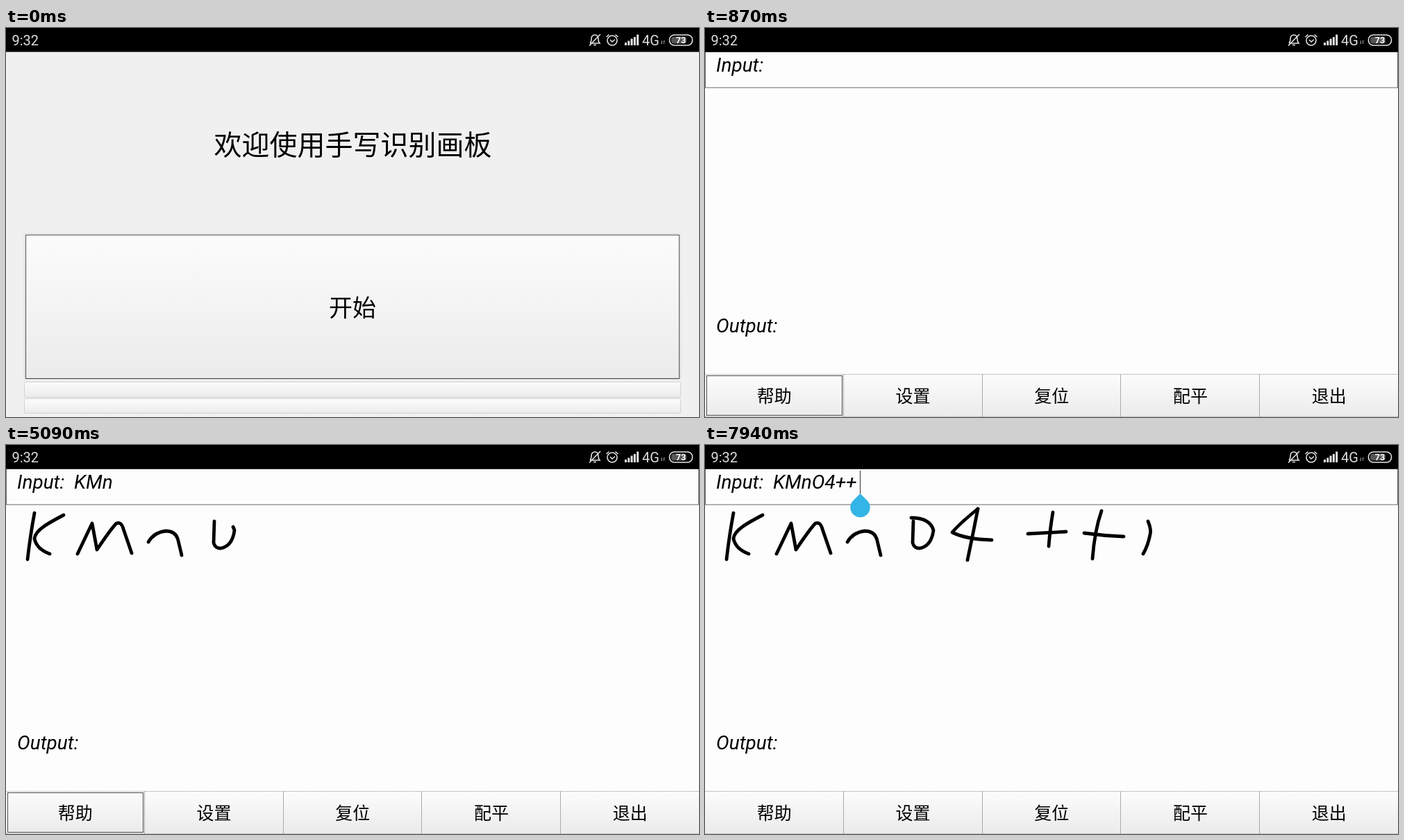
Write an HTML page that moves like this. It is 998 px wide and 561 px high and loops after 7.99 s.

```html
<!DOCTYPE html>
<html lang="zh-CN">
<head>
<meta charset="utf-8">
<title>手写识别画板</title>
<style>
  html, body { margin: 0; width: 100%; height: 100%; overflow: hidden; background: #f0f0f0; }
  svg { display: block; width: 100%; height: 100%; }
  text { white-space: pre; }
  .cjk { font-family: "Noto Sans CJK SC", "Noto Sans CJK", sans-serif; text-anchor: middle; }
  .field { font: italic 28px Roboto, sans-serif; }
  .status { font: 20px Roboto, sans-serif; fill: #ddd; }
  .icon { fill: none; stroke: #e4e4e4; stroke-width: 1.6; }
  .focus { fill: none; stroke: #4c4c4c; }
  #ink { fill: none; stroke: #000; stroke-width: 4.8; stroke-linecap: round; stroke-linejoin: round; }
</style>
</head>
<body>
<svg viewBox="0 0 998 561">
  <defs>
    <linearGradient id="face" x2="0" y2="1"><stop stop-color="#fcfcfc"/><stop offset="1" stop-color="#ebebeb"/></linearGradient>
    <linearGradient id="hover" x2="0" y2="1"><stop stop-color="#fff"/><stop offset="1" stop-color="#f2f2f2"/></linearGradient>
  </defs>

  <g id="home">
    <rect width="998" height="561" fill="#f0f0f0"/>
    <text class="cjk" x="499.5" y="183" font-size="40">欢迎使用手写识别画板</text>
    <g stroke="#d2d2d2" fill="url(#face)">
      <rect id="start" x="26.5" y="296.5" width="945" height="210" rx="1"/>
      <rect x="26.5" y="510.5" width="945" height="22" rx="1"/>
      <rect x="26.5" y="534.5" width="945" height="21" rx="1"/>
    </g>
    <rect class="focus" x="28.5" y="298.5" width="941" height="207"/>
    <text class="cjk" x="499" y="416" font-size="34">开始</text>
  </g>

  <g id="board">
    <rect width="998" height="561" fill="#fdfdfd"/>
    <rect x=".5" y="34.5" width="997" height="51.5" fill="none" stroke="#666"/>
    <text class="field" id="input" x="16" y="63"></text>
    <text class="field" x="16" y="439">Output:</text>
    <g id="buttons"></g>
    <rect class="focus" id="focus" x="2.5" y="501.5" width="195" height="57"/>
    <g id="ink"></g>
    <g id="caret">
      <path d="M223.5 37V72" stroke="#333"/>
      <path d="M223.5 70l10 10a14.2 14.2 0 1 1-20 0z" fill="#33b5e5"/>
    </g>
  </g>

  <rect width="998" height="34.5"/>
  <text class="status" x="8.5" y="25">9:32</text>
  <path class="icon" d="M841 22h14q-2-2-2-6 0-6-5-6t-5 6q0 4-2 6M846 24.5h4M840 25.5 856 9"/>
  <g class="icon">
    <circle cx="873" cy="18" r="7"/>
    <path d="M864.5 13l4-3.5M881.5 13l-4-3.5M870 17l3 3 4-3.5"/>
  </g>
  <path d="M891 25v-4h3v4zm4.3 0v-6.5h3V25zm4.3 0v-9.5h3V25zm4.3 0V13h3v12zm4.3 0V9.5h3V25z" fill="#e4e4e4"/>
  <text class="status" x="916" y="25">4G</text>
  <path d="M944.5 18v5m-1.5-1.5 1.5 1.5M947.5 23v-5m1.5 1.5-1.5-1.5" stroke="#999" fill="none"/>
  <rect x="958" y="12.5" width="22" height="10" rx="4" fill="#555"/>
  <rect class="icon" x="955.5" y="10" width="33" height="15" rx="7"/>
  <text class="status" x="972" y="22" text-anchor="middle" style="font-size:12.5px;font-weight:bold;fill:#fff">73</text>
</svg>
<script>
const LOOP = 7990;
const el = id => document.getElementById(id);
const show = (node, on) => node.setAttribute("display", on ? "inline" : "none");

el("buttons").innerHTML = ["帮助", "设置", "复位", "配平", "退出"].map((label, i) => {
  const x = i * 199.75;
  return `<rect x="${x}" y="499" width="199.75" height="61.5" fill="url(#face)"/>
    <path d="M${x} 499.5h199.75M${x} 560.5h199.75" stroke="#c4c4c4"/>
    <path d="M${Math.round(x) - .5} 499V561" stroke="#aaa"/>
    <text class="cjk" x="${x + 99.7}" y="540" font-size="25">${label}</text>`;
}).join("");
const reset = el("buttons").querySelectorAll("rect")[2];

// Pen strokes: start, end, path
const strokes = [
  [2910, 3070, "M41 98Q35 130 31 165"],
  [3190, 3450, "M83 101C60 113 42 123 41 135Q44 150 63 157"],
  [3680, 4070, "M103 157L124 113L131 151Q151 121 159 113Q166 110 169 121L181 156"],
  [4270, 4500, "M205 140Q213 126 230 124Q245 124 248 138L253 159"],
  [4820, 5200, "M300 110L299 141Q301 149 309 149Q326 146 329 123Q324 105 297 105"],
  [5480, 5690, "M393 92Q367 113 356 126Q376 136 413 137"],
  [5780, 5920, "M393 92Q386 128 378 166"],
  [6270, 6400, "M465 128L520 125"],
  [6500, 6630, "M501 97Q497 120 495 146"],
  [7060, 7190, "M546 127Q575 131 603 132"],
  [7290, 7440, "M571 95Q561 124 558 164"],
  [7730, 7930, "M638 110Q643 122 641 129Q638 145 631 157"]
];
el("ink").innerHTML = strokes.map(s => `<path pathLength="1" stroke-dasharray="1 2" d="${s[2]}"/>`).join("");
const paths = [...el("ink").children];

const formula = "KMnO4++";
const recognised = [3620, 4240, 4700, 5330, 6110, 6840, 7660];

function draw() {
  const t = performance.now() % LOOP;
  show(el("home"), t < 850);
  show(el("board"), t >= 850);
  el("start").setAttribute("fill", `url(#${t > 450 ? "hover" : "face"})`);
  reset.setAttribute("fill", `url(#${t > 1990 && t < 2905 ? "hover" : "face"})`);

  strokes.forEach(([from, to], i) => {
    const p = Math.min(1, (t - from) / (to - from));
    show(paths[i], p > 0);
    paths[i].setAttribute("stroke-dashoffset", 1 - Math.max(0, p));
  });

  const count = recognised.filter(at => t >= at).length;
  el("input").textContent = "Input:\u00a0\u00a0" + formula.slice(0, count);
  show(el("caret"), count === 7);
  show(el("focus"), count < 7);
  requestAnimationFrame(draw);
}
draw();
</script>
</body>
</html>
```
